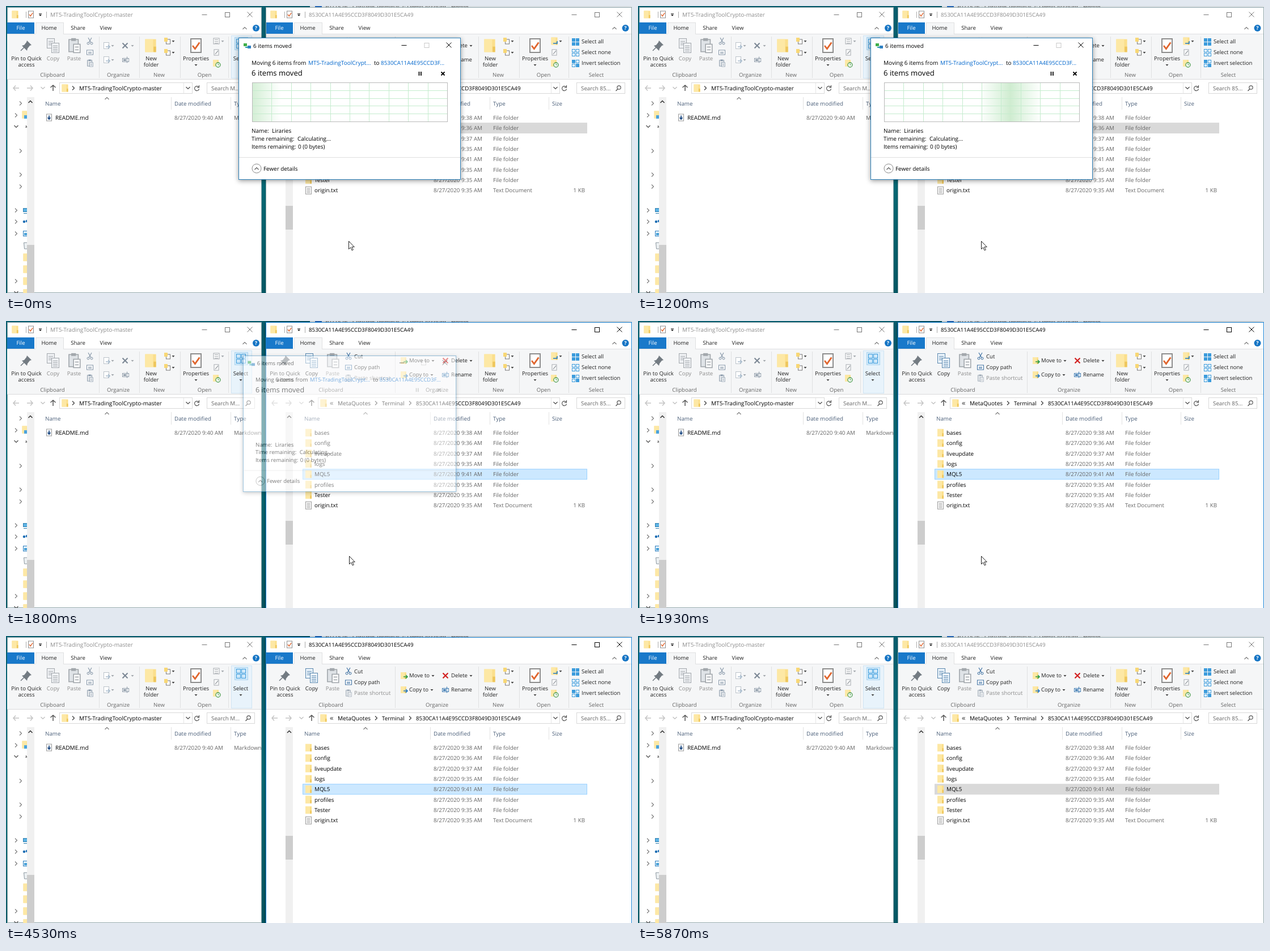
An HTML page that plays this animation: 1104 by 507 pixels, repeating every 6070 ms.

```html
<!DOCTYPE html>
<html lang="en">
<head>
<meta charset="utf-8">
<title>Moving files</title>
<style>
html, body { margin: 0; width: 100%; height: 100%; overflow: hidden; background: #07606e; }
svg { display: block; width: 1104px; height: 507px; }
text { font-family: "Open Sans", "Noto Sans", sans-serif; text-rendering: geometricPrecision; white-space: pre; }
#dialog { transform-origin: 606px 181px; }
#dialogBox { filter: drop-shadow(0 2px 4px rgba(0, 0, 0, .4)); }
</style>
</head>
<body>
<svg id="stage" viewBox="0 0 1104 507"></svg>
<script>
const LOOP = 6070;
const INK = '#000', DARK = '#222', GREY = '#666', FAINT = '#a3a8ad', BLUE = '#1979ca', SKY = '#3a9bdc';
const HASH = '8530CA11A4E95CCD3F8049D301E5CA49';

// Drawing helpers; text is placed by its vertical centre
const rect = (x, y, w, h, fill, stroke, more = '') => stroke
  ? `<rect x="${x + .5}" y="${y + .5}" width="${w - 1}" height="${h - 1}" fill="${fill}" stroke="${stroke}" ${more}/>`
  : `<rect x="${x}" y="${y}" width="${w}" height="${h}" fill="${fill}" ${more}/>`;
const path = (d, stroke = INK, width = 1, fill = 'none', more = '') =>
  `<path d="${d}" stroke="${stroke}" stroke-width="${width}" fill="${fill}" ${more}/>`;
const text = (s, x, y, fill = INK, size = 9.8, anchor = 'start', more = '') =>
  `<text x="${x}" y="${y + size * .36}" font-size="${size}" fill="${fill}" text-anchor="${anchor}" ${more}>${s}</text>`;
const mid = (s, x, y, fill = DARK, size = 9.6) => text(s, x, y, fill, size, 'middle');
const group = (id, body) => `<g id="${id}">${body}</g>`;
const at = (x, y, body, more = '') => `<g transform="translate(${x} ${y}) ${more}">${body}</g>`;
const vline = (x, y1, y2, c = '#dfe0e1') => rect(x, y1, 1, y2 - y1, c);
const hline = (y, x1, x2, c = '#dfe0e1') => rect(x1, y, x2 - x1, 1, c);

// Small glyphs
const drop = (x, y, c = '#444') => path(`M${x - 2.5} ${y - 1}h5l-2.5 3z`, 'none', 0, c);
const right = (x, y, c = '#777') => path(`M${x - 2} ${y - 3.5}l3.5 3.5l-3.5 3.5`, c, 1.1);
const down = (x, y, c = '#444', w = 1.1) => path(`M${x - 3.5} ${y - 2}l3.5 3.5l3.5 -3.5`, c, w);
const up = (x, y, c = '#555', w = 1.1) => path(`M${x - 3.5} ${y + 2}l3.5 -3.5l3.5 3.5`, c, w);
const cross = (x, y, r, c = INK, w = 1) =>
  path(`M${x - r} ${y - r}l${2 * r} ${2 * r}M${x + r} ${y - r}l${-2 * r} ${2 * r}`, c, w);
const arrow = (x, y, turn, c, w = 1.5) => at(x, y, path('M-5 0H5M1 -4.5L5 0L1 4.5', c, w), `rotate(${turn})`);
const folder = (x, y, s = 1) => at(x, y,
  rect(-5.5, -6.5, 11, 13, '#fbdf8c') + rect(-5.5, -6.5, 8, 13, '#fde8a5') + rect(3, 1, 2.5, 5.5, '#eec65c'), `scale(${s})`);
const sheet = (x, y, w, h, c = '#8b8f94', fill = '#fff') => rect(x - w / 2, y - h / 2, w, h, fill, c);
const lines = (x, y, w, n, c, gap = 3) =>
  Array.from({ length: n }, (_, i) => hline(y + i * gap, x, x + w, c)).join('');
const checkDoc = (x, y, s = 1) => at(x, y,
  sheet(0, 0, 10, 13, '#8d8d8d') + path('M-3 0l2.2 2.8l4 -5.6', '#e0662f', 1.4), `scale(${s})`);
const pages = (x, y, c, fill) => sheet(x - 4, y - 4, 14, 18, c, fill) + lines(x - 8, y - 8, 8, 3, c) +
  sheet(x + 4, y + 4, 14, 18, c, fill) + lines(x, y, 8, 4, c);
const smallPages = (x, y, c) => sheet(x - 2, y - 1, 8, 9, c) + sheet(x + 2, y + 2, 8, 9, c);
const help = (x, y) => `<circle cx="${x}" cy="${y}" r="6" fill="#1474c4"/>` + text('?', x, y, '#fff', 9, 'middle', 'font-weight="700"');
const scissors = (x, y, c) => path(`M${x - 3} ${y - 6}l5 9M${x + 3} ${y - 6}l-5 9`, c, 1.1) +
  [-3, 3].map(d => `<circle cx="${x + d}" cy="${y + 4}" r="2" fill="none" stroke="${c}"/>`).join('');
const pasteDoc = (x, y, c, s = 1) => at(x, y,
  rect(-6, -7, 11, 14, '#dfe3e7', c) + rect(-3, -8, 5, 3, c) + rect(-1, -2, 8, 10, '#fff', c) + lines(1, 1, 4, 2, c), `scale(${s})`);
const rename = (x, y, c) => rect(x - 6, y - 3, 12, 7, '#fff', c) + rect(x - 4, y - 1, 5, 3, c) + path(`M${x + 2.5} ${y - 5.5}v11`, c);
const tip = (x, y, c) => path(`M${x - 4} ${y}h6M${x} ${y - 3}l3 3l-3 3`, c, 1.7);
const moveIcon = (x, y, c) => folder(x - 1, y, .9) + tip(x + 3, y + 2, c);
const faintMove = (x, y) => sheet(x - 1, y, 10, 12, '#bcc3ca') + tip(x + 2, y + 2, '#a9bccd');
const squares = (x, y, size, fill) => [0, 1, 2, 3].map(i =>
  rect(x - size + (i % 2) * (size + 1), y - size + (i >> 1) * (size + 1), size, size, fill[i] || '#fff', SKY)).join('');
const controls = (x, y, gap, c, boxColor = c) => path(`M${x - 4.5} ${y + .5}h9`, c) +
  rect(x + gap - 4, y - 4, 9, 9, 'none', boxColor) + cross(x + 2 * gap, y, 4.5, c);

function titleBar(x, title, c, size, id = '') {
  return folder(x + 16, 15) + vline(x + 35, 10, 21, '#aaa') + checkDoc(x + 44, 15) +
    hline(13, x + 58, x + 63, '#333') + drop(x + 60.5, 16, '#222') + vline(x + 71, 10, 21, '#aaa') +
    text(title, x + 78, 15, c, size, 'start', id && `id="${id}"`);
}

function ribbonBase(x, left, edge) {
  return rect(left, 49, edge - left, 81, '#f5f6f7') + hline(49, left, edge) + hline(129, left, edge, '#dadbdc') +
    rect(left, 29, x + 50 - left, 20, BLUE) + mid('File', x + 26, 39, '#fff') +
    rect(x + 52, 29, 49, 21, '#f5f6f7') + vline(x + 52, 29, 49) + vline(x + 101, 29, 49) + hline(29, x + 52, x + 101) +
    mid('Home', x + 76, 39) + mid('Share', x + 127, 39) + mid('View', x + 176, 39) +
    at(x + 35, 70, path('M2 -9l8 8l-3 1l-4 5l-1 4l-9 -9l4 -1l4 -5z', 'none', 0, '#737b82') + path('M-2 2l-7 7', '#737b82', 1.6)) +
    mid('Pin to Quick', x + 36, 93) + mid('access', x + 36, 104);
}

function newAndOpen(x) {
  const small = y => sheet(x + 286, y + 1, 8, 9, '#777') + rect(x + 279, y - 6, 6, 7, '#f8d775') + drop(x + 295, y);
  return folder(x + 255, 70, 1.75) + mid('New', x + 256, 93) + mid('folder', x + 256, 104) +
    small(62) + small(82) + mid('New', x + 270, 122, GREY) + vline(x + 307, 54, 127) +
    checkDoc(x + 335, 70, 2) + mid('Properties', x + 335, 93) + drop(x + 335, 104) + mid('Open', x + 350, 122, GREY);
}

function openIcons(x, active) {
  return (active ? folder(x, 62) + path(`M${x - 2} 66h7v-4`, BLUE, 1.5) : sheet(x, 62, 11, 11, FAINT) + lines(x - 3, 59, 6, 3, FAINT)) +
    drop(x + 11, 62, active ? '#444' : FAINT) + sheet(x, 82, 9, 11, FAINT) + path(`M${x - 2} 85l5 -6`, FAINT, 1.5) +
    folder(x - 1, 101, .9) + `<circle cx="${x + 3}" cy="104" r="4" fill="#fff" stroke="#4c9c50" stroke-width="1.3"/>` +
    path(`M${x + 3} 101.5v2.5h2`, '#4c9c50');
}

function addressBar(x, end, searchX, searchW, hint) {
  return arrow(x + 18, 145, 180, '#c4c4c4') + arrow(x + 42, 145, 0, '#c4c4c4') + down(x + 65, 145, '#bbb') +
    arrow(x + 83, 145, -90, '#555') + rect(x + 94, 135, end - x - 94, 20, '#fff', '#d9d9d9') +
    vline(end - 16, 136, 154, '#e5e5e5') + folder(x + 104, 145) + down(end - 8, 145) +
    path(`M${end + 11} 143.5a4 4 0 1 0 .5 3M${end + 11.5} 140v4h-4`, '#555', 1.2) +
    rect(searchX, 135, searchW, 20, '#fff', '#d9d9d9') + text(hint, searchX + 8, 145, GREY) +
    `<circle cx="${searchX + searchW - 11}" cy="144" r="3.2" fill="none" stroke="#555" stroke-width="1.2"/>` +
    path(`M${searchX + searchW - 13} 146.5l-3.5 3.5`, '#555', 1.4);
}

const header = (cols, seps) => cols.map(([s, x]) => text(s, x, 172, '#4c607a')).join('') +
  seps.map(x => vline(x, 161, 183, '#e3e3e3')).join('');
const textDoc = (x, y) => sheet(x, y, 11, 14, '#999') + lines(x - 3, y - 4, 6, 4, '#999', 2.5);

function leftWindow() {
  const closed = [[26, 172], [18, 193], [26, 256], [26, 298], [26, 319], [18, 361], [18, 381], [18, 402], [18, 486]];
  const tree = closed.map(([x, y]) => right(x, y)).join('') + down(18, 213) + down(18, 506) +
    folder(34, 192) + rect(32, 193, 6, 6, '#4ba3dc') + path('M35 211l2 3h-3', '#333') +
    rect(30, 357, 9, 7, '#5db4e6', '#317fae') + hline(366, 31, 38, '#317fae') +
    '<circle cx="32" cy="381" r="2.3" fill="#1f6fb5"/><circle cx="37" cy="380" r="2.3" fill="#1f6fb5"/>' +
    rect(30, 397, 9, 10, '#e6f3fb', '#2c7fc0') + rect(32, 401, 6, 4, '#48a0d8') +
    path('M31.5 418h7l-1 11h-5z', '#8b969e', 1, '#edf1f3') + [444, 465, 486, 507].map(y => folder(36, y)).join('');
  return rect(2, 2, 449, 505, '#fff', '#8fa5aa') + titleBar(0, 'MT5-TradingToolCrypto-master', '#8d8d8d', 10.1) +
    controls(350, 15, 40, '#777') + up(421, 39, '#777') + help(441, 39) + ribbonBase(0, 2, 450) +
    pages(83, 70, FAINT, '#eef0f3') + mid('Copy', 83, 93, '#8c8c8c') + pasteDoc(120, 70, FAINT, 1.65) + mid('Paste', 120, 93, '#8c8c8c') +
    scissors(148, 62, '#8293a5') + sheet(148, 82, 12, 9, '#8293a5') + lines(145, 81, 6, 2, '#8293a5', 2) + pasteDoc(148, 101, '#8293a5', .8) +
    mid('Clipboard', 82, 122, GREY) + vline(164, 54, 127) +
    faintMove(178, 70) + drop(188, 70, FAINT) + faintMove(178, 95) + drop(188, 95, FAINT) +
    cross(210, 70, 4.5, '#7b8794', 2) + drop(223, 70, FAINT) + rename(211, 95, '#8b98a6') +
    mid('Organize', 198, 122, GREY) + vline(235, 54, 127) + newAndOpen(0) + openIcons(371, false) + vline(392, 54, 127) +
    rect(397, 52, 37, 76, '#e8f3fb', '#cfe4f3') + rect(403, 55, 24, 23, '#d2eafa', '#a9d3ef') +
    squares(414, 66, 8, ['#cfe8f9', '#cfe8f9', '#cfe8f9', '#cfe8f9']) + mid('Select', 414, 93) + drop(414, 104) +
    addressBar(0, 329, 354, 85, 'Search M...') + right(119, 145, '#333') + text('MT5-TradingToolCrypto-master', 129, 145, INK, 10.1) +
    tree + rect(37, 161, 13, 346, '#f0f0f0') + up(43, 169, '#333', 1.5) + rect(37, 422, 13, 85, '#cdcdcd') +
    header([['Name', 69], ['Date modified', 297], ['Type', 402]], [291, 396]) + up(178, 163, '#777') +
    sheet(76, 197, 10, 13, '#999') + path('M76 193.5v5M73.5 197l2.5 3l2.5 -3', '#234f86', 1.8) + text('README.md', 87, 197, INK, 10.1) +
    text('8/27/2020 9:40 AM', 297, 197, GREY) + `<svg width="450" height="507">${text('Markdown Source', 402, 197, GREY)}</svg>`;
}

const rowY = i => 197.3 + i * 18.35;

function rightWindow() {
  const files = [['bases', 38], ['config', 36], ['liveupdate', 37], ['logs', 35], ['MQL5', 41], ['profiles', 35], ['Tester', 35], ['origin.txt', 35]];
  const rows = files.map(([name, min], i) => {
    const y = rowY(i), isText = i == 7;
    return (isText ? textDoc(533.5, y) : folder(533.5, y)) + text(name, 544, y, INK, 9.9) +
      text(`8/27/2020 9:${min} AM`, 754, y, GREY) + text(isText ? 'Text Document' : 'File folder', 859, y, GREY);
  }).join('') + text('1 KB', 1021, rowY(7), GREY, 9.8, 'end');
  const selects = [['Select all', 63, [SKY, SKY, SKY, SKY]], ['Select none', 82, []], ['Invert selection', 101, [SKY, '', '', SKY]]]
    .map(([s, y, f]) => squares(1004, y, 6, f) + text(s, 1015, y, DARK, 9.6)).join('');
  return rect(458, 2, 645, 520, '#fff', '', 'id="shade"') + rect(458, 2, 646, 520, '#fff', '#8fa5aa', 'id="frame"') +
    titleBar(456, HASH, INK, 9.75, 'title') + group('controls', controls(1002, 15, 40, 'currentColor')) +
    up(1073, 39, '#777') + help(1092.5, 39) + ribbonBase(456, 459, 1103) +
    pages(539, 70, '#5b87ad', '#eaf3fb') + mid('Copy', 539, 93) + pasteDoc(576, 70, FAINT, 1.65) + mid('Paste', 576, 93, '#8c8c8c') +
    scissors(604, 62, '#3b6ea0') + text('Cut', 614, 63, DARK, 9.6) +
    sheet(604, 82, 12, 9, '#3b6ea0') + lines(601, 81, 6, 2, '#3b6ea0', 2) + text('Copy path', 614, 82, DARK, 9.6) +
    pasteDoc(604, 101, '#9aa6b2', .8) + text('Paste shortcut', 614, 101, '#8c8c8c', 9.6) +
    mid('Clipboard', 573, 122, GREY) + vline(686, 54, 127) +
    moveIcon(702, 70, '#2f9e49') + text('Move to', 711, 70, DARK, 9.6) + drop(753, 70) +
    moveIcon(702, 95, '#2b7ec9') + text('Copy to', 711, 95, DARK, 9.6) + drop(751, 95) +
    cross(775, 70, 4.5, '#d21f1f', 2.2) + text('Delete', 785, 70, DARK, 9.6) + drop(820, 70) +
    rename(775, 95, '#3b78b0') + text('Rename', 785, 95, DARK, 9.6) + mid('Organize', 760, 122, GREY) + vline(833, 54, 127) +
    newAndOpen(598) + openIcons(967, true) + vline(992, 54, 127) + selects + mid('Select', 1041, 122, GREY) +
    addressBar(456, 977, 1006, 86, 'Search 85...') + smallMarks() +
    rect(493, 161, 13, 346, '#f0f0f0') + up(499.5, 169, '#333', 1.5) + rect(493, 353, 13, 42, '#cdcdcd') +
    header([['Name', 526], ['Date modified', 754], ['Type', 859], ['Size', 963]], [748, 853, 957]) + up(634, 163, '#777') +
    rect(523, 206, 502, 19, '#d9d9d9', '#d9d9d9', 'id="pick"') + rows;
}

function smallMarks() {
  return text('«', 571, 144, '#333', 13) + text('MetaQuotes', 585, 145, INK, 10.1) + right(653, 145, '#333') +
    text('Terminal', 663, 145) + right(713, 145, '#333') + text(HASH, 723, 145, INK, 9.75);
}

function dialog() {
  let grid = '';
  for (let i = 1; i < 10; i++) grid += vline(Math.round(434 + i * 34.4), 136, 204, '#c5ecce');
  for (let i = 1; i < 5; i++) grid += hline(Math.round(135 + i * 13.8), 435, 778, '#c5ecce');
  const details = [['Name:', 'Liraries', 469], ['Time remaining:', 'Calculating...', 514], ['Items remaining:', '0 (0 bytes)', 515]]
    .map(([k, v, x], i) => text(k, 433, 220 + i * 14, INK, 10) + text(v, x, 220 + i * 14, INK, 10)).join('');
  return rect(410, 56, 392, 251, '#fff', '#2b7fb8', 'id="dialogBox"') +
    rect(419, 66, 6, 5, '#3fae49') + rect(426, 70, 6, 5, '#2d7dc4') + path('M422 73h6', '#2b9ab0', 2) +
    text('6 items moved', 436, 70, INK, 9.9) + controls(702, 69, 39.5, INK, '#c8c8c8') +
    text('Moving 6 items from', 433, 100, INK, 10.05) + text('MT5-TradingToolCrypt...', 533, 100, '#0066cc', 10) +
    text('to', 649, 100, INK, 10) + text('8530CA11A4E95CCD3F...', 661, 100, '#0066cc', 9.85) +
    text('6 items moved', 433, 118.5, INK, 13.1) +
    group('buttons', path('M728.5 116v7M732 116v7', 'currentColor', 1.7) + cross(770.5, 119.5, 3, 'currentColor', 1.8)) +
    group('graph', rect(434, 135, 345, 70, '#fff') +
      '<svg x="435" y="136" width="343" height="68"><rect id="glow" width="110" height="68" fill="url(#green)"/></svg>' +
      grid + rect(434, 135, 345, 70, 'none', '#b9b9b9')) + details + hline(267, 411, 801, '#dfdfdf') +
    '<circle cx="442" cy="287" r="8" fill="#fff" stroke="#8a8a8a"/>' + up(442, 287, '#555') + text('Fewer details', 454, 287, INK, 9.9);
}

const stage = document.getElementById('stage');
stage.innerHTML = `<defs>
  <linearGradient id="teal" x2="0" y2="1"><stop stop-color="#0a5f70"/><stop offset=".5" stop-color="#08707c"/><stop offset="1" stop-color="#055a66"/></linearGradient>
  <linearGradient id="green"><stop stop-color="#d3f0d6" stop-opacity="0"/><stop offset=".5" stop-color="#cfecd0"/><stop offset="1" stop-color="#d3f0d6" stop-opacity="0"/></linearGradient>
  </defs>` + rect(0, 0, 1104, 507, 'url(#teal)') + rect(536, 0, 568, 507, '#e4e9ec') + rect(545, 0, 12, 3, '#2f6fc0') +
  text('3071526 - Corvane Terminal 2: Demo Account - Hedge', 562, 1, '#555', 10.1) +
  leftWindow() + rightWindow() + group('dialog', dialog()) +
  path('M.5 .5v14l3.2 -3l2.4 5.2l2.2 -1l-2.4 -5h4.4z', '#222', 1, '#fff', 'id="cursor"');

const el = Object.fromEntries([...stage.querySelectorAll('[id]')].map(e => [e.id, e]));

// Pointer path: time, x, y
const POINTER = [[0, 604, 415], [330, 605, 415], [3600, 605, 415], [3670, 585, 412], [3870, 415, 392], [4070, 215, 420],
  [4270, 107, 465], [4400, 75, 492], [4470, 59, 503], [4530, 45, 512]];

function pointer(t) {
  const i = POINTER.findIndex(k => k[0] > t);
  if (i < 0) return [-50, 520];
  const [a, b] = [POINTER[i - 1], POINTER[i]], p = (t - a[0]) / (b[0] - a[0]);
  return t < 3600 ? [a[1], a[2]] : [a[1] + (b[1] - a[1]) * p, a[2] + (b[2] - a[2]) * p];
}

function set(node, attrs) {
  for (const k in attrs) node.setAttribute(k, attrs[k]);
}

function draw(t) {
  // The screen was refreshed 15 times a second
  const tick = Math.floor(t * .015 + .06);
  const now = Math.round(tick * 20 / 3) * 10;

  const [x, y] = pointer(now);
  set(el.cursor, { transform: `translate(${x} ${y})` });

  set(el.glow, { x: 430 + .189 * Math.min(now, 1330) - 55 - 435 });
  set(el.buttons, { color: now < 1330 ? INK : '#b5b5b5' });
  el.graph.style.display = now < 1670 ? '' : 'none';

  const fade = Math.min(1, Math.max(0, (now - 1670) / 260));
  el.dialog.style.display = fade < 1 ? '' : 'none';
  el.dialog.style.opacity = 1 - fade;
  el.dialog.style.transform = `scale(${1 - .08 * fade})`;

  const active = now >= 1730 && now < 5800;
  set(el.title, { fill: active ? INK : '#8d8d8d' });
  set(el.controls, { color: active ? INK : '#777' });
  set(el.frame, { stroke: active ? '#1883d7' : '#8fa5aa' });
  el.shade.style.filter = `drop-shadow(0 2px 5px rgba(0,0,0,${active ? .45 : .12}))`;

  const blue = now >= 1330 && now < 5800;
  set(el.pick, { y: rowY(now < 1400 ? 1 : 4) - 9, fill: blue ? '#cce8ff' : '#d9d9d9', stroke: blue ? '#99d1ff' : '#d9d9d9' });
}

const start = performance.now();
function loop() {
  draw((performance.now() - start) % LOOP);
  requestAnimationFrame(loop);
}
loop();
</script>
</body>
</html>
```
